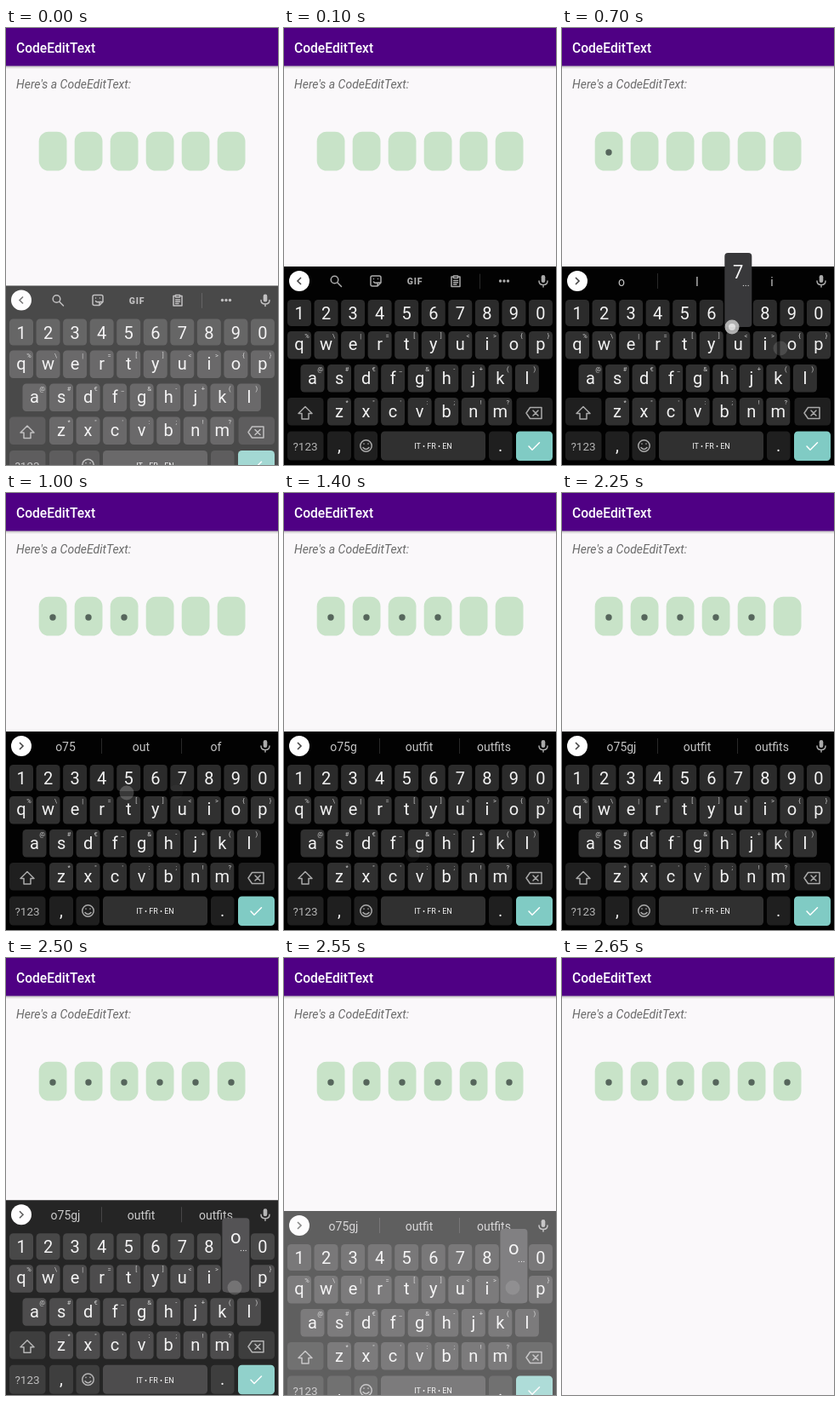
Recreate the animation shown at these times as an HTML page. Size 320 by 513 pixels, loop 3.65 s.

```html
<!DOCTYPE html>
<html lang="en">
<head>
<meta charset="utf-8">
<title>Code entry</title>
<style>
html, body { margin: 0; width: 100%; height: 100%; overflow: hidden; background: #faf8fa; }
svg { display: block; width: 100%; height: 100%; font-family: Roboto, sans-serif; }
.mid { text-anchor: middle; }
.line { fill: none; stroke: #aaa; stroke-width: 1.5; stroke-linecap: round; stroke-linejoin: round; }
</style>
</head>
<body>
<svg viewBox="0 0 320 513">
  <defs>
    <linearGradient id="shade" x2="0" y2="1">
      <stop stop-color="#000" stop-opacity=".28"/>
      <stop offset="1" stop-color="#000" stop-opacity="0"/>
    </linearGradient>
  </defs>
  <rect width="320" height="513" fill="#faf8fa"/>
  <rect y="44" width="320" height="4" fill="url(#shade)"/>
  <rect width="320" height="44.5" fill="#4f0084"/>
  <text x="12" y="28.5" font-size="15.6" font-weight="500" fill="#fff">CodeEditText</text>
  <text x="12" y="71" font-size="14" font-style="italic" fill="#6b6b6b">Here's a CodeEditText:</text>
  <g id="code"></g>
  <g id="board">
    <rect y="280" width="320" height="240" fill="#020202"/>
    <circle cx="18" cy="297" r="12" fill="#fff"/>
    <path id="chevron" fill="none" stroke="#444" stroke-width="1.6"/>
    <g id="tools" class="line">
      <circle cx="59.5" cy="295.5" r="4.3"/><path d="M63 299l4.500 4.500"/>
      <path d="M104 291h8q2 0 2 2v6l-4 4h-6q-2 0-2-2v-8q0-2 2-2zM114 299h-4v4M105.500 298q1.500 2 3.500 1M105.500 294.500v.1M110.500 294.500v.1"/>
      <text class="mid" x="154" y="301" font-size="10.5" font-weight="900" letter-spacing=".8" fill="#aaa" stroke="none">GIF</text>
      <path d="M199 292h-2v11.500h10v-11.500h-2M199.500 291h5v2.500h-5zM199.500 296.500h5M199.500 298.700h5M199.500 301h3.500"/>
      <path d="M230.500 289v17" stroke="#292929" stroke-width="1"/>
      <g fill="#aaa" stroke="none"><circle cx="254.500" cy="297" r="1.700"/><circle cx="259" cy="297" r="1.700"/><circle cx="263.500" cy="297" r="1.700"/></g>
    </g>
    <g id="words" class="mid" font-size="14" fill="#c4c4c4">
      <path d="M112.500 288v18M206.500 288v18" stroke="#292929"/>
      <text x="70" y="302.500"></text><text x="159" y="302.500"></text><text x="247" y="302.500"></text>
    </g>
    <rect x="302.700" y="290" width="4.600" height="9" rx="2.300" fill="#aaa"/>
    <path class="line" stroke-width="1.300" d="M300 297q0 4.500 5 4.500t5-4.500M305 301.500v2.500"/>
    <g id="keys"></g>
    <g id="icons" class="line">
      <path d="M25 444.500l8 8h-4v6.500h-8v-6.500h-4z"/>
      <path d="M285 452l4.500-6.500h13.500v13h-13.500zM293 449l6 6M299 449l-6 6"/>
      <circle cx="96.500" cy="490.500" r="6.700"/><path d="M93 492.500q3.500 4 7 0M94 488v.3M99 488v.3"/>
      <path d="M288 491l4 4.200l8.500-8.500" stroke="#fff"/>
    </g>
    <g id="popup" class="mid" fill="#f2f2f2">
      <rect width="32" height="87" rx="4" fill="#38383a"/>
      <text id="letter" x="16" y="30" font-size="22"></text>
      <text x="25" y="39" font-size="11">...</text>
    </g>
  </g>
  <g id="touches"></g>
</svg>
<script>
const LOOP = 3650, STEP = 50, PITCH = 31.55;
const $ = id => document.getElementById(id);
const rect = (x, y, w, h, rx, fill) =>
  `<rect x="${x}" y="${y}" width="${w}" height="${h}" rx="${rx}" fill="${fill}"/>`;
const label = (s, x, y, size, fill = "#f2f2f2") =>
  `<text class="mid" x="${x}" y="${y}" font-size="${size}" fill="${fill}">${s.replace("&", "&amp;").replace("<", "&lt;")}</text>`;

const rows = [
  { x: 18, top: 319, base: 342, chars: "1234567890", hints: "", fill: "#2b2b2b" },
  { x: 18, top: 356, base: 378, chars: "qwertyuiop", hints: "%\\|=[]<>{}", fill: "#303030" },
  { x: 33.5, top: 395, base: 417.5, chars: "asdfghjkl", hints: "@#€_&-+()", fill: "#303030" },
  { x: 65, top: 434, base: 456.5, chars: "zxcvbnm", hints: "*\"':;!?", fill: "#303030" }
];
const keyAt = {};
let keys = "";
for (const row of rows) {
  [...row.chars].forEach((c, i) => {
    const x = row.x + i * PITCH;
    keyAt[c] = { x, top: row.top };
    keys += rect(x - 14, row.top, 28, row.top === 319 ? 31 : 32.5, 4.5, row.fill) + label(c, x, row.base, 20);
    if (row.hints) keys += label(row.hints[i], x + 9, row.top + 8, 7.5, "#ccc");
  });
}
const dark = "#1f1f1f";
keys += rect(4, 434, 42.5, 32.5, 4.5, dark) + rect(273.5, 434, 42.5, 32.5, 4.5, dark)
  + rect(4, 473.5, 42.5, 34, 4.5, dark) + rect(51, 473.5, 28, 34, 4.5, dark)
  + rect(82.5, 473.5, 27.5, 34, 4.5, dark) + rect(114, 473.5, 123, 34, 4.5, "#303030")
  + rect(241, 473.5, 27.5, 34, 4.5, dark) + rect(273, 473.5, 43, 34.5, 4.5, "#80cbc4")
  + label("?123", 25, 496, 13.5, "#b4b4b4") + label(",", 65, 497, 20)
  + label("IT • FR • EN", 175.5, 494.3, 9) + label(".", 254.7, 497, 20);
$("keys").innerHTML = keys;

let boxes = "";
for (let i = 0; i < 6; i++) {
  const x = 38.7 + i * 42;
  boxes += rect(x, 121.7, 32.8, 45.8, 11.5, "#c8e3c8")
    + `<circle class="dot" cx="${x + 16.3}" cy="146" r="3.7" fill="#56665c"/>`;
}
$("code").innerHTML = boxes;
const dots = document.querySelectorAll(".dot");

const presses = [
  { key: "o", down: 450, up: 600, x: 257, y: 376 },
  { key: "7", down: 650, up: 780, x: 200, y: 351 },
  { key: "5", down: 880, up: 980, x: 142, y: 352 },
  { key: "g", down: 1100, up: 1200, x: 151, y: 425 },
  { key: "j", down: 1800, up: 1950, x: 218, y: 418 },
  { key: "o", down: 2350, up: 2480, x: 269, y: 387 }
];
const guesses = [
  ["", "", ""], ["o", "I", "i"], ["o7", "of", "or"], ["o75", "out", "of"],
  ["o75g", "outfit", "outfits"], ["o75gj", "outfit", "outfits"]
];
$("touches").innerHTML = presses.map(p =>
  `<g><circle cx="${p.x}" cy="${p.y}" r="8.5" fill="#c8c8c8"/><circle cx="${p.x}" cy="${p.y}" r="4" fill="#fff"/></g>`).join("");
const touches = [...$("touches").children];
const words = document.querySelectorAll("#words text");
const show = (el, on) => el.setAttribute("visibility", on ? "visible" : "hidden");

function touchAlpha(p, t) {
  if (t < p.down) return 0;
  return t < p.up ? 0.85 : Math.max(0, 0.3 * (1 - (t - p.up) / 250));
}

function slide(t) {
  const enter = Math.min(1, t / 100);
  const exit = Math.min(1, Math.max(0, (t - 2450) / 200));
  return {
    y: 22.5 * (1 - enter) ** 2 + 68 * exit ** 2,
    alpha: 0.71 + 0.29 * enter - exit ** 1.4
  };
}

function draw(t) {
  const count = presses.filter(p => t >= p.up).length;
  dots.forEach((d, i) => show(d, i < count));

  const { y, alpha } = slide(t);
  $("board").setAttribute("transform", `translate(0 ${y})`);
  $("board").setAttribute("opacity", t < 2650 ? Math.max(0, alpha) : 0);

  const typed = count > 0;
  $("chevron").setAttribute("d", typed ? "M16 293l4 4l-4 4" : "M20 293l-4 4l4 4");
  $("tools").style.display = typed ? "none" : "";
  $("words").style.display = typed ? "" : "none";
  words.forEach((w, i) => { w.textContent = guesses[Math.min(count, 5)][i]; });

  const held = presses.find(p => t >= p.down && (t < p.up || p === presses[5]));
  $("popup").style.display = held ? "" : "none";
  if (held) {
    const k = keyAt[held.key];
    $("popup").setAttribute("transform", `translate(${k.x - 16} ${k.top - 55})`);
    $("letter").textContent = held.key;
  }
  touches.forEach((el, i) => {
    const p = presses[i];
    el.setAttribute("opacity", t < 2650 ? touchAlpha(p, t) : 0);
    show(el.lastChild, t < p.up);
  });
}

const start = performance.now();
function tick() {
  const t = (performance.now() - start) % LOOP;
  draw(Math.floor(t / STEP) * STEP);
  requestAnimationFrame(tick);
}
tick();
</script>
</body>
</html>
```
